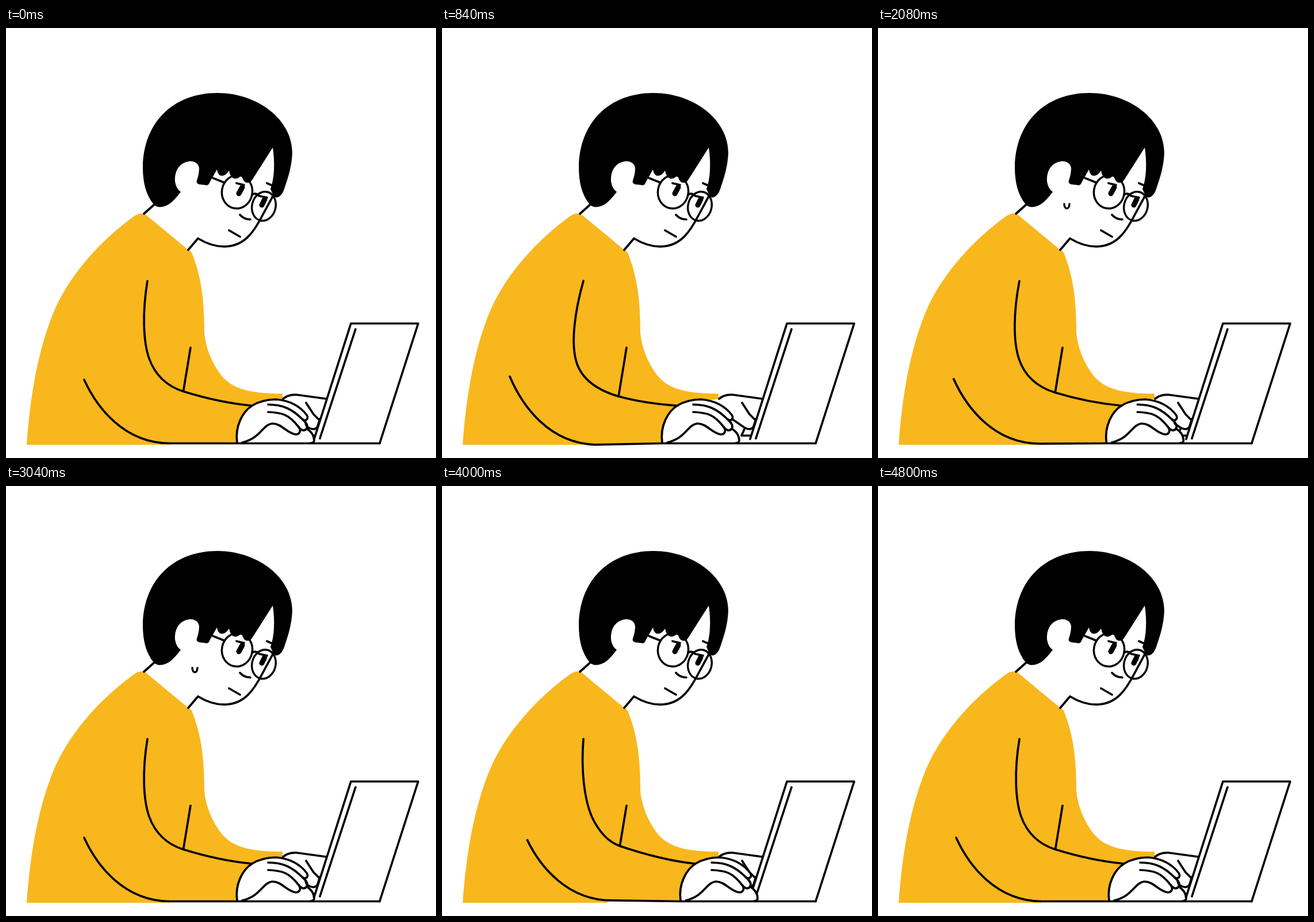
These frames come from a looping animation (748x748 px, 5 s). An HTML page with a canvas:

```html
<!DOCTYPE html>
<html lang="en">
<head>
<meta charset="utf-8">
<title>Typing at a laptop</title>
<style>
html, body { margin: 0; width: 100%; height: 100%; overflow: hidden; background: #fff; }
canvas { display: block; width: 100vw; height: 100vh; }
</style>
</head>
<body>
<canvas id="stage" width="748" height="748"></canvas>
<script>
const ctx = document.getElementById('stage').getContext('2d');
const LOOP = 5000, STEP = 40;
const YELLOW = '#f8b71d', INK = '#000';

function fill(d, color) {
  ctx.fillStyle = color;
  ctx.fill(new Path2D(d));
}

function line(d, width = 3.7) {
  ctx.lineWidth = width;
  ctx.stroke(new Path2D(d));
}

function lens(x, y, rx, ry, tilt) {
  ctx.lineWidth = 3.5;
  ctx.beginPath();
  ctx.ellipse(x, y, rx, ry, tilt, 0, Math.PI * 2);
  ctx.stroke();
}

// Arm slides: start, end, offset before, offset after
const slides = [
  [520, 840, 0, -19],
  [1880, 2160, -19, 0],
  [3200, 3560, 0, 13],
  [4440, 4800, 13, 0]
];
const taps = [200, 1320, 1560, 2520, 2760, 3760];
const TAP = 240;

const ease = p => (p + p * p * (3 - 2 * p)) / 2;

function armShift(t) {
  let shift = 0;
  for (const [start, end, from, to] of slides) {
    if (t < start) break;
    shift = from + (to - from) * ease(Math.min(1, (t - start) / (end - start)));
  }
  return shift;
}

function fingerLift(t) {
  const start = taps.find(s => t >= s && t < s + TAP);
  return start === undefined ? 0 : Math.sin(Math.PI * (t - start) / TAP);
}

function drawBody(d) {
  fill(`M36 725 C42 640 56 556 86 487 C115 424 168 367 222 328
    Q232 321 241 323 L317 386 Q323 388 325 396 C340 435 345 475 345 530
    C347 555 358 583 375 605 C397 632 437 636 481 636 L481 645
    L${440 + d} 655 L${408 + d} 722 L${285 + d} ${722 - 0.12 * d} L285 725 Z`, YELLOW);
}

function drawHead() {
  fill(`M257 307 C243 290 238 268 238 242 C239 165 290 113 368 113
    C437 113 498 159 498 217 C497 243 490 262 484 280
    C480 292 472 298 466 293 L460 280 C467 262 468 234 464 208
    L429 263 Q424 272 416 268 Q411 264 410 255
    Q405 263 397 262 Q390 260 388 248
    Q382 258 374 257 Q368 255 367 246 L354 269 Q352 275 346 273
    L336 272 Q330 270 332 265 C335 257 336 249 336 244
    C335 235 327 231 318 232 C300 235 293 250 294 267
    Q296 280 304 285 C294 298 286 307 276 310 Q264 314 257 307 Z`, INK);
  line('M258 307 L240 323');
  line('M317 386 L334 366 C352 377 370 381 384 380 C416 378 432 353 445 328 L465 291');
  lens(402, 285, 26.5, 29, 0.18);
  lens(448.5, 310, 20.5, 25.5, 0.25);
  line('M360 261 L380 269');
  line('M428 290 Q434 286 439 291');
  line('M454 270 L461 273');
  line('M401 270 L414 273');
  line('M440 292 L454 295');
  line('M411 277 L405 288', 9);
  line('M450 298 L445 308', 9);
  line('M407 325 Q414 333 425 333');
  line('M388 352 L407 363');
}

function drawFarHand() {
  fill('M481 645 Q490 637 505 638 L557 644 L541 699 L520 709 L481 680 Z', '#fff');
  line('M482 645 Q491 637 506 638 L557 645');
  line('M522 652 L535 672 L547 684');
  line('M500 677 L526 695 C535 700 541 698 543 690 L546 680');
  line('M526 698 L521 709 H538');
}

function drawLaptop() {
  fill('M600 514 H717 L650 722.5 H534 Z', '#fff');
  line('M536 715 L600 514 H717 L650 722.5');
  line('M608 524 L546 714');
}

function drawNearHand(d, lift) {
  const tip = 673 - 6 * lift, under = 681 - 4 * lift;
  const knuckles = `M402 721 C398 692 412 667 428 657 C441 649 456 646 470 646
    C492 ${648 - lift} 510 ${656 - 4 * lift} 523 ${tip}
    C527 ${tip + 6} 522 ${under + 4} 516 ${under}`;
  const middle = 'C523 687 526 692 523 697 C519 702 513 700 509 694';
  const palm = 'M523 697 C533 703 536 710 536 718 Q535 722 530 722';
  ctx.save();
  ctx.translate(d, 0);
  fill(`${knuckles} L516 681 L523 697 C533 703 536 710 536 718 Q535 722 530 722 L402 722 Z`, '#fff');
  line(knuckles);
  line(`M456 655 C482 655 498 663 516 ${under}`);
  line(`M516 681 ${middle} C492 672 480 669 456 668`);
  line('M509 694 C514 700 511 707 504 707 C488 705 480 688 463 688 C446 690 444 713 411 721');
  line(palm);
  ctx.restore();
}

function drawSleeve(d) {
  line(`M246 440 C${237 + 0.35 * d} 495 ${238.5 + 0.7 * d} 545 ${249 + 0.88 * d} 575
    C${260 + 1.12 * d} 605 ${280 + 0.85 * d} ${623 - 0.25 * d} ${308 + 0.1 * d} ${632 - 0.45 * d}
    C340 ${642 - 0.42 * d} ${386 + 0.4 * d} ${653 - 0.1 * d} ${428 + 0.95 * d} 657`);
  line(`M321 556 L${308.5 + 0.07 * d} ${632 - 0.45 * d}`);
  line(`M${136 + 0.95 * d} ${612 + 0.3 * d}
    C${158 + 0.95 * d} ${660 + 0.1 * d} ${205 + d} 722 ${285 + d} ${722.5 - 0.12 * d}
    L${402 + d} 722.5 H650`);
}

function drawSweat(t) {
  if (t < 2040 || t >= 3200) return;
  const y = 306 + (t - 2080) * 0.0105;
  line(`M324 ${y} C324 ${y + 10.5} 333 ${y + 10.5} 333 ${y}`, 3.4);
}

function draw(t) {
  const d = armShift(t);
  ctx.fillStyle = '#fff';
  ctx.fillRect(0, 0, 748, 748);
  ctx.strokeStyle = INK;
  ctx.lineCap = ctx.lineJoin = 'round';
  drawBody(d);
  drawHead();
  drawSweat(t);
  drawFarHand();
  drawLaptop();
  drawNearHand(d, fingerLift(t));
  drawSleeve(d);
}

const began = performance.now();
function tick() {
  const t = (performance.now() - began) % LOOP;
  draw(Math.floor(t / STEP) * STEP);
  requestAnimationFrame(tick);
}
tick();
</script>
</body>
</html>
```
